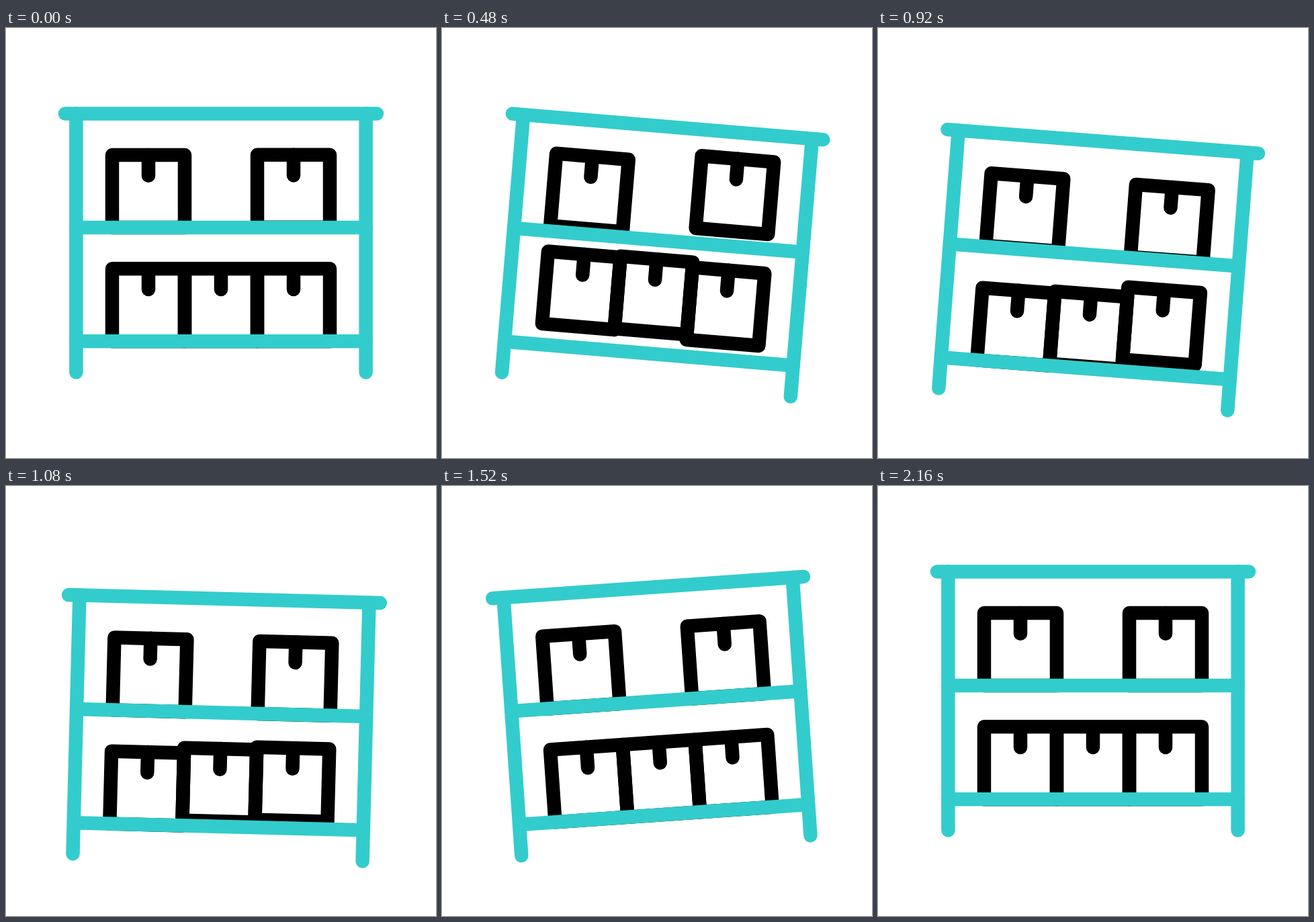
An HTML page with a canvas that plays this animation: 640 by 640 pixels, repeating every 2.24 s.

```html
<!DOCTYPE html>
<html>
<head>
<meta charset="utf-8">
<style>
html, body { margin: 0; width: 100%; height: 100%; overflow: hidden; background: #fff; }
canvas { display: block; }
</style>
</head>
<body>
<canvas id="stage" width="640" height="640"></canvas>
<script>
const ctx = document.getElementById('stage').getContext('2d');
const LOOP = 2240, STEP = 40;
const BOX = 108, HALF = BOX / 2;
const TOP = -192.5, LEG = 215.6, OVERHANG = 16.4;

// all places are measured from the centre of the stage
const shelfY = row => -23 + 169.3 * row;

const progress = (t, from, to) => Math.min(1, Math.max(0, (t - from) / (to - from)));

// steep symmetric ease for the rack
function ease(t, from, to) {
  const u = progress(t, from, to), a = u * u, b = (1 - u) * (1 - u);
  return a / (a + b);
}

// soft bump that lifts a box and sets it down again
function hop(t, height, peak, rise, fall = rise) {
  const u = (t - peak) / (t < peak ? rise : fall);
  return Math.abs(u) < 1 ? height * Math.cos(u * Math.PI / 2) ** 2 : 0;
}

function line(x1, y1, x2, y2) {
  ctx.beginPath();
  ctx.moveTo(x1, y1);
  ctx.lineTo(x2, y2);
  ctx.stroke();
}

function drawBox(col, row, lift) {
  const x = col * BOX, y = shelfY(row) - BOX - lift;
  ctx.strokeRect(x - HALF, y, BOX, BOX);
  line(x, y, x, y + 30.7);
}

function drawBoxes(t) {
  ctx.strokeStyle = '#000';
  drawBox(-1, 0, hop(t, 13.6, 640, 360));
  drawBox(1, 0, hop(t, 22.5, 490, 515));
  drawBox(-1, 1, hop(t, 31.4, 450, 440));
  drawBox(0, 1, hop(t, 33.2, 450, 440) + hop(t, 8.6, 1040, 200));
  drawBox(1, 1, hop(t, 25.6, 520, 520, 1050));
}

function drawRack() {
  ctx.strokeStyle = '#33cccc';
  line(-LEG - OVERHANG, TOP, LEG + OVERHANG, TOP);
  for (const x of [-LEG, LEG]) line(x, TOP, x, -TOP);
  for (const row of [0, 1]) line(-LEG, shelfY(row), LEG, shelfY(row));
}

function draw(t) {
  // sway right, then left, then upright, while sinking and rising once
  const angle = 6 * ease(t, 0, 722) - 10.05 * ease(t, 636, 1571) + 4.05 * ease(t, 1466, 2160);
  const drop = 41 * (ease(t, 26, 974) - ease(t, 966, 2150));

  ctx.setTransform(1, 0, 0, 1, 0, 0);
  ctx.fillStyle = '#fff';
  ctx.fillRect(0, 0, 640, 640);
  ctx.translate(320, 320 + drop);
  ctx.rotate(angle * Math.PI / 180);
  ctx.lineWidth = 20.5;
  ctx.lineCap = ctx.lineJoin = 'round';
  drawBoxes(t);
  drawRack();
}

function tick() {
  const t = performance.now() % LOOP;
  draw(Math.floor(t / STEP) * STEP);
  requestAnimationFrame(tick);
}
tick();
</script>
</body>
</html>
```
